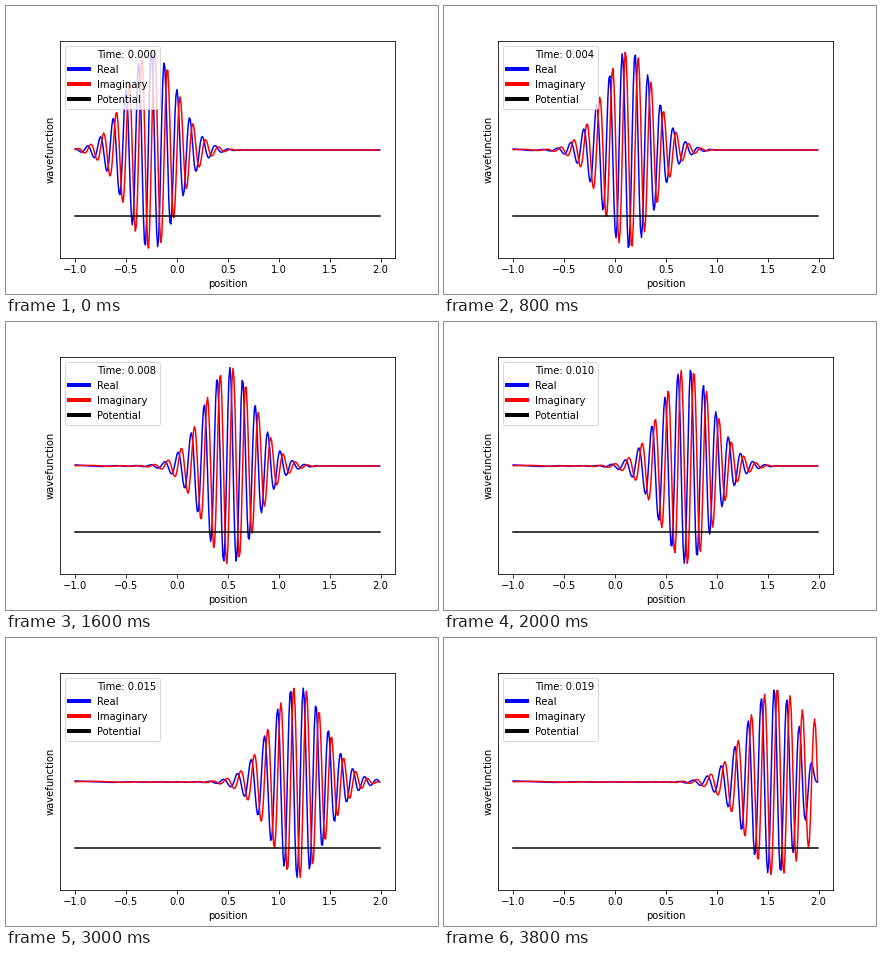
A matplotlib script that plays this animation: 432 by 288 pixels, repeating every 4 s.

```python
import numpy as np
import matplotlib.pyplot as plt
from matplotlib.animation import FuncAnimation
from matplotlib.lines import Line2D

plt.rcParams["font.family"] = "DejaVu Sans"

FRAMES, INTERVAL, DT = 20, 200, 0.001
DX, K, X0, SIGMA = 0.01, 50, -0.25, 0.25

x = -1 + DX * np.arange(300)
psi0 = ((np.pi * SIGMA**2) ** -0.25
        * np.exp(-(x - X0) ** 2 / (2 * SIGMA**2) + 1j * K * x))

# Finite-difference modes of i psi_t = -psi_xx, with both end values held.
n = len(x) - 1
m = np.arange(1, n)
modes = np.sqrt(2 / n) * np.sin(np.pi * np.outer(m, m) / n)
energy = (2 * np.sin(np.pi * m / (2 * n)) / DX) ** 2
steady = psi0[0] + (psi0[-1] - psi0[0]) * np.arange(n + 1) / n
coef = modes @ (psi0 - steady)[1:-1]


def wave(t):
    psi = steady.copy()
    psi[1:-1] += modes @ (coef * np.exp(-1j * energy * t))
    return psi


fig, ax = plt.subplots(figsize=(6, 4), dpi=72)
fig.subplots_adjust(left=0.125, right=0.9, bottom=0.125, top=0.88)

real, = ax.plot(x, psi0.real, color="blue")
imag, = ax.plot(x, psi0.imag, color="red")
ax.plot(x, np.full_like(x, -1), color="black")
ax.set_xlim(ax.get_xlim())
ax.set_ylim(ax.get_ylim())
ax.set_yticks([])
ax.set_xlabel("position")
ax.set_ylabel("wavefunction")

handles = [Line2D([0], [0], color=c, lw=4)
           for c in ("white", "blue", "red", "black")]
legend = ax.legend(handles, ["Time: 0.000", "Real", "Imaginary", "Potential"],
                   loc="upper left")
clock = legend.get_texts()[0]


def update(i):
    t = i * DT
    psi = wave(t)
    real.set_ydata(psi.real)
    imag.set_ydata(psi.imag)
    clock.set_text(f"Time: {t:.3f}")
    return real, imag, legend


anim = FuncAnimation(fig, update, frames=FRAMES, interval=INTERVAL,
                     repeat=True, repeat_delay=0, blit=False)
plt.show()
```
